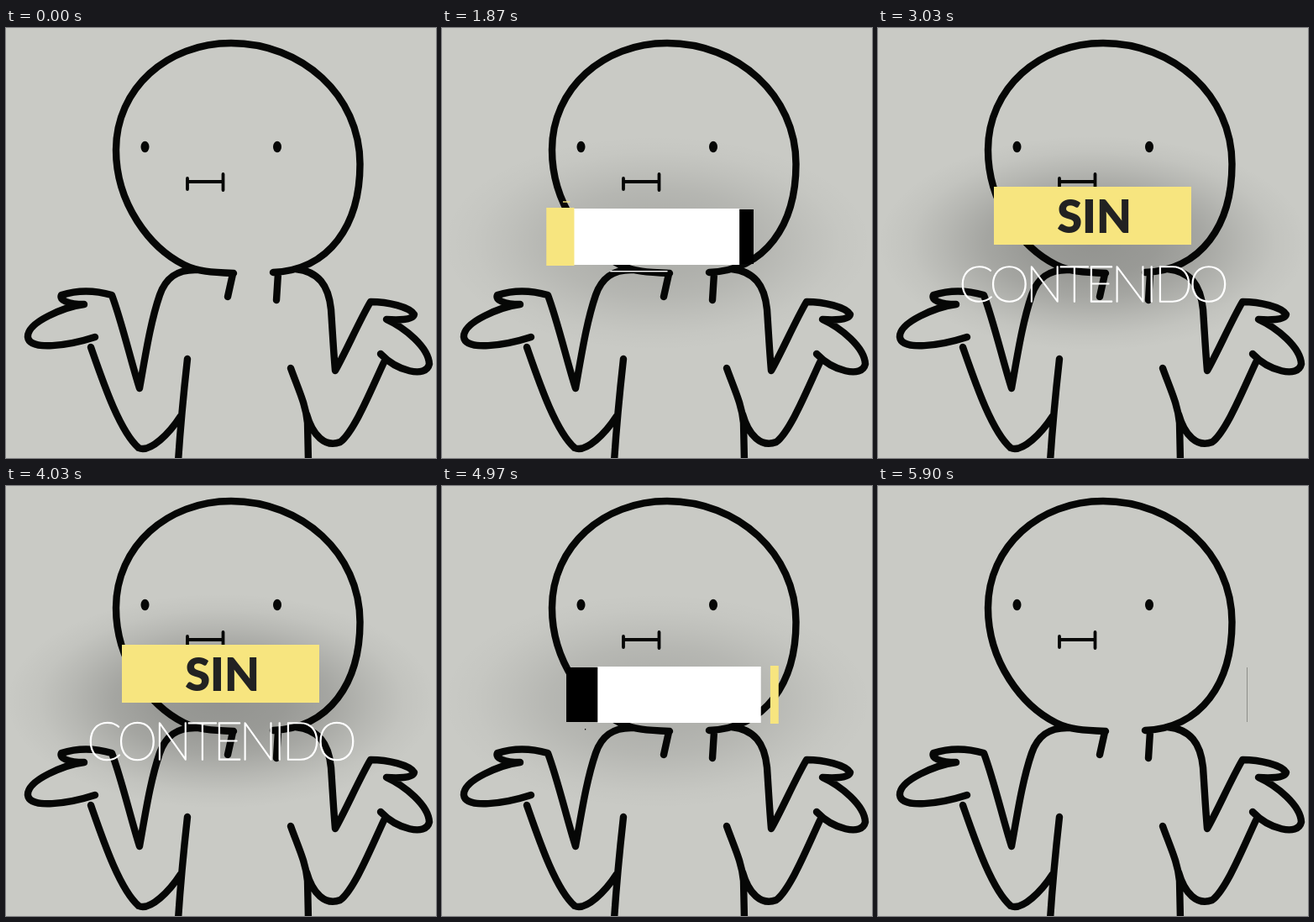
An HTML page with a canvas that plays this animation: 512x512 px, repeating every 6010 ms.

```html
<!DOCTYPE html>
<html lang="es">
<head>
<meta charset="utf-8">
<title>Sin contenido</title>
<style>
html, body { margin: 0; width: 100%; height: 100%; overflow: hidden; background: #c9cac5; }
canvas { display: block; width: 100vw; height: 100vh; }
</style>
</head>
<body>
<canvas id="stage" width="512" height="512"></canvas>
<script>
const ctx = document.getElementById('stage').getContext('2d');
const LOOP = 6010, START = 1170, END = 5900;
const INK = '#060706', YELLOW = '#f7e57f', WHITE = '#fff', BLACK = '#000';
const LEFT = 138, RIGHT = 373;

const clamp = v => Math.max(0, Math.min(1, v));
const lerp = (a, b, p) => a + (b - a) * p;
const span = (t, from, length) => clamp((t - from) / length);

// Cubic bezier (.5, 0, 0, 1)
function ease(x) {
  if (x <= 0 || x >= 1) return clamp(x);
  let lo = 0, hi = 1;
  for (let i = 0; i < 24; i++) {
    const u = (lo + hi) / 2;
    if (1.5 * u * (1 - u) ** 2 + u ** 3 < x) lo = u; else hi = u;
  }
  return lo * lo * (3 - 2 * lo);
}
const move = (t, from, length) => ease(span(t, from, length));

const body = new Path2D(`
  M271 292C245 291 228 290 212 282C172 262 131 210 131 145C131 72 192 18 268 18
  C352 18 421.500 80 421.500 162C421.500 235 385 288 318 291
  M270 293L264 320M324 292L322 324
  M228 288C203 287 190 298 183 318C172 350 166 390 159 429C149 398 138 350 126 318
  C105 312 85 312 66 318C63 324 74 329 93 329C70 332 25 350 26 368C28 385 75 378 106 368
  M101 380C115 420 135 480 158 500C172 506 195 482 208 462
  M216 394C212 430 208 470 205 516
  M345 287C372 290 384 306 387 335C389 365 390 385 392 408C405 385 420 350 434 326
  C455 326 480 332 486 341C485 348 465 348 453 347C475 357 503 380 504 400
  C500 418 465 408 446 388
  M450 398C435 430 415 480 398 493C380 500 365 485 358 460
  M339 405C348 430 357 448 359 470L360 516`);
const mouth = new Path2D('M217 183H258M216 179V192M258.500 174V193');

// The figure never changes, so it is drawn once with slightly soft edges
function makeFigure() {
  const canvas = document.createElement('canvas');
  canvas.width = canvas.height = 512;
  const c = canvas.getContext('2d');
  c.fillStyle = '#c9cac5';
  c.fillRect(0, 0, 512, 512);
  c.filter = 'blur(0.7px)';
  c.strokeStyle = c.fillStyle = INK;
  c.lineCap = c.lineJoin = 'round';
  c.lineWidth = 8.4;
  c.stroke(body);
  c.lineWidth = 3.8;
  c.stroke(mouth);
  for (const x of [165.5, 323]) {
    c.beginPath();
    c.ellipse(x, 141.5, 5, 6.8, 0, 0, Math.PI * 2);
    c.fill();
  }
  return canvas;
}
const figure = makeFigure();

function drawShadow(t) {
  const alpha = span(t, START, 1300) * (1 - span(t, 4300, 1400));
  if (!alpha) return;
  ctx.save();
  ctx.globalAlpha = alpha;
  ctx.translate(256, 256);
  ctx.scale(1, 0.5);
  const glow = ctx.createRadialGradient(0, 0, 0, 0, 0, 256);
  glow.addColorStop(0, 'rgba(0,0,0,.27)');
  glow.addColorStop(0.3, 'rgba(0,0,0,.24)');
  glow.addColorStop(0.5, 'rgba(0,0,0,.18)');
  glow.addColorStop(0.7, 'rgba(0,0,0,.09)');
  glow.addColorStop(0.85, 'rgba(0,0,0,.03)');
  glow.addColorStop(1, 'rgba(0,0,0,0)');
  ctx.fillStyle = glow;
  ctx.fillRect(-256, -512, 512, 1024);
  ctx.restore();
}

const bars = [
  { color: BLACK, pad: 0, from: 84, start: 1137, to: 440, leave: 4820 },
  { color: WHITE, pad: 1, from: 103, start: 1342, to: 412, leave: 4703 },
  { color: YELLOW, pad: 2, from: 122, start: 1684, to: 402, leave: 4174 }
];

function drawBars(t) {
  const lift = 25 * move(t, 2160, 700) * (1 - move(t, 4040, 850));
  let l, w, top, h;
  for (const b of bars) {
    const p = move(t, b.start, 850), q = move(t, b.leave, 1150);
    l = lerp(lerp(b.from, LEFT, p), b.to, q);
    w = lerp(lerp(b.from, RIGHT, p), b.to, q) - l;
    top = 216 - b.pad - lift;
    h = 65 + 2 * b.pad;
    ctx.fillStyle = b.color;
    ctx.fillRect(l, top, w, h);
  }
  // The word shows only inside the front bar
  ctx.save();
  ctx.beginPath();
  ctx.rect(l, top, w, h);
  ctx.clip();
  ctx.font = '900 54px Lato, sans-serif';
  ctx.textAlign = 'center';
  ctx.fillStyle = '#222';
  ctx.fillText('SIN', 257.5, 268.5 - lift);
  ctx.restore();
}

const streaks = [
  { color: BLACK, y: 207, x: 143, start: 1150 },
  { color: YELLOW, y: 207, x: 143, start: 1775 },
  { color: BLACK, y: 289.7, x: 170, start: 1200 },
  { color: WHITE, y: 289.7, x: 170, start: 1670 },
  { color: YELLOW, y: 207, x: 143, start: 4980 },
  { color: BLACK, y: 289.7, x: 170, start: 4930 },
  { color: BLACK, y: 207, x: 143, start: 5230 }
];

function drawStreaks(t) {
  for (const s of streaks) {
    const head = s.x + 170 * move(t, s.start, 600);
    const tail = s.x + 170 * move(t, s.start + 60, 600);
    if (head - tail < 0.2) continue;
    ctx.fillStyle = s.color;
    ctx.fillRect(tail, s.y - 0.7, head - tail, 1.4);
  }
}

function drawCaption(t) {
  const grow = 1 - (1 - span(t, 2370, 700)) ** 2.2;
  const q = grow * (1 - span(t, 4030, 600) ** 2.2);
  if (q < 0.02) return;
  const gap = -4.7 + 39 * (1 - q);
  const x = 257 + gap / 2, y = 277 + 49 * q;
  ctx.save();
  ctx.font = `100 ${61 * q}px Lato, sans-serif`;
  ctx.letterSpacing = `${gap}px`;
  ctx.textAlign = 'center';
  ctx.globalAlpha = clamp(q * 1.7);
  ctx.fillStyle = ctx.strokeStyle = WHITE;
  ctx.lineWidth = 1.5 * q;
  ctx.lineJoin = 'round';
  ctx.fillText('CONTENIDO', x, y);
  ctx.strokeText('CONTENIDO', x, y);
  ctx.restore();
}

function render(now) {
  const t = Math.min(now % LOOP, END);
  ctx.drawImage(figure, 0, 0);
  if (t >= START) {
    drawShadow(t);
    drawStreaks(t);
    drawBars(t);
    drawCaption(t);
  }
}

const origin = performance.now();
function tick() {
  render(performance.now() - origin);
  requestAnimationFrame(tick);
}
tick();
</script>
</body>
</html>
```
